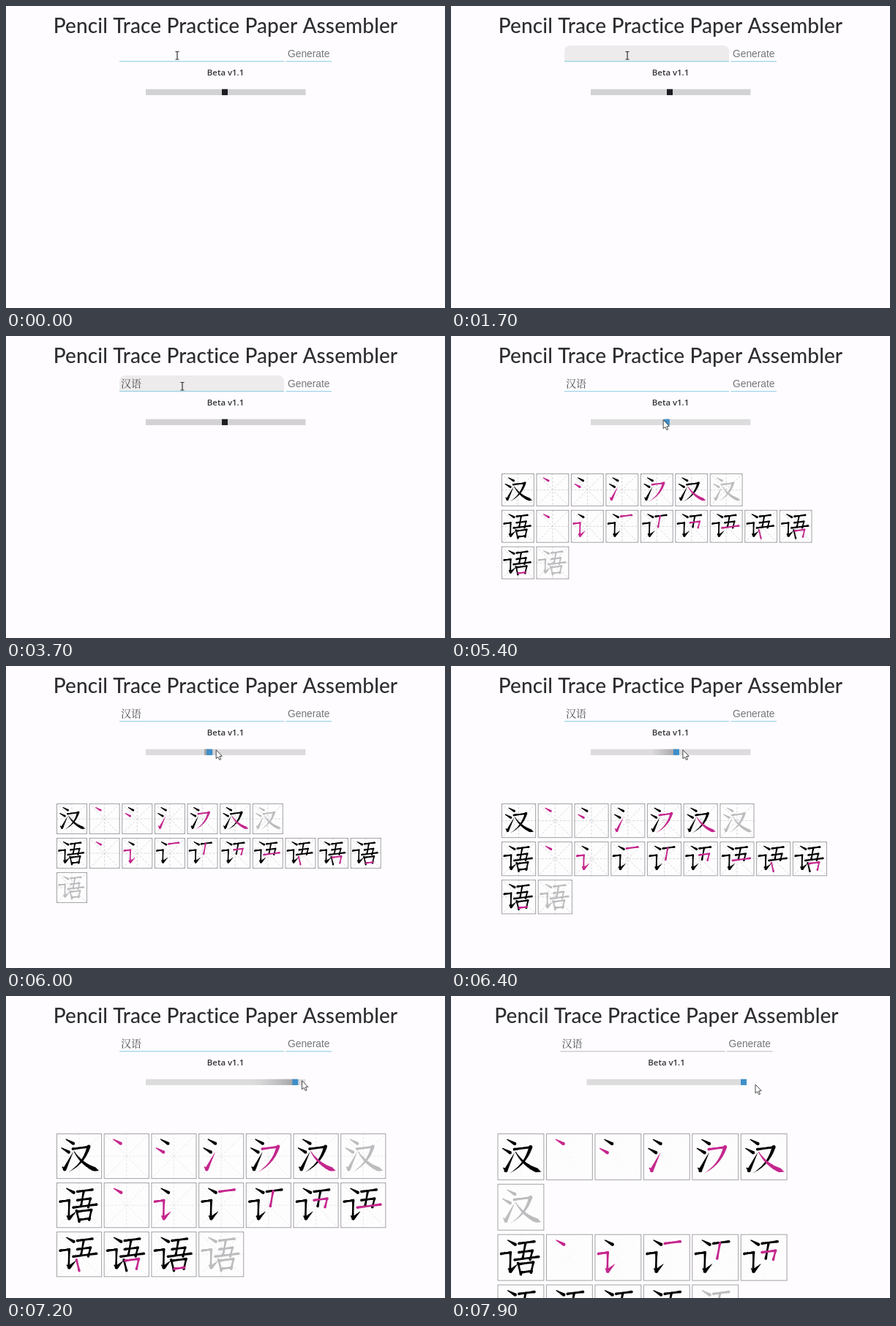
These frames come from a looping animation (600 px wide and 413 px high, 8 s). An HTML page with a canvas:

```html
<!DOCTYPE html>
<html lang="en">
<head>
<meta charset="utf-8">
<title>Pencil Trace Practice Paper Assembler</title>
<style>
  html, body { margin: 0; width: 100%; height: 100%; overflow: hidden; background: #fefcff; }
  canvas { display: block; width: 600px; height: 413px; }
</style>
</head>
<body>
<canvas id="stage"></canvas>
<script>
const W = 600, H = 413, LOOP = 8000, STEP = 100;
const INK = '#000', PINK = '#c4268c', PALE = '#bcbcbe', BLUE = '#3f8fc8';
const canvas = document.getElementById('stage');
const ctx = canvas.getContext('2d');
const dpr = window.devicePixelRatio || 1;
canvas.width = W * dpr;
canvas.height = H * dpr;

const mix = (a, b, u) => a + (b - a) * u;
const ramp = (t, from, to) => Math.max(0, Math.min(1, (t - from) / (to - from)));
const accel = u => u ** 1.4;

// One brush pull in a 100-unit cell; width is a function of progress, bend bows it sideways.
function pull(x, y, dx, dy, width, bend = 0) {
  const path = new Path2D();
  for (let i = 0; i <= 40; i++) {
    const u = i / 40, bow = bend * 4 * u * (1 - u), r = width(u) / 2;
    const px = x + dx * u - dy * bow, py = y + dy * u + dx * bow;
    path.moveTo(px + r, py);
    path.arc(px, py, r, 0, 7);
  }
  return path;
}

function join(...pulls) {
  const path = new Path2D();
  pulls.forEach(p => path.addPath(p));
  return path;
}

const even = u => 4.2 + 1.6 * (2 * u - 1) ** 2;
const swell = u => 2 + 5 * u;
const taper = u => 8 - 7 * u;
const flare = u => Math.max(1, Math.min(2 + 9 * u, 60 * (1 - u)));

const dot = (x, y) => pull(x, y, 16, 9, swell);
const bar = (x, y, len) => pull(x, y, len, -0.13 * len, even);
const fall = (x, y, lean, len) => pull(x, y, lean, len, even);
const turn = (x, y, len, drop) => join(bar(x, y, len), fall(x + len, y - 0.13 * len, -5, drop));
const flick = (x, y, dx, dy) => join(pull(x - 5, y - 5, 5, 5, swell), pull(x, y, dx, dy, taper));
const sweep = (x, y, len) => join(bar(x, y, len), pull(x + len, y - 5, -43, 55, taper, -0.1));
const press = (x, y) => pull(x, y, 55, 42, flare, 0.1);

const glyphs = [
  [dot(21, 13), dot(11, 32), flick(18, 79, 18, -37), sweep(36, 34, 35), press(39, 40)],
  [dot(22, 13), join(bar(8, 42, 20), fall(28, 39, -1, 40), flick(28, 79, 15, -15)),
    bar(46, 20, 33), fall(60, 19, -6, 33), turn(46, 39, 29, 19), bar(37, 55, 51),
    fall(44, 62, 6, 24), turn(47, 64, 30, 22), bar(51, 82, 22)]
];

// The thumb dips left, then speeds up to the right end.
const thumbAt = t => 299 - 28 * accel(ramp(t, 5250, 5820)) + 134.5 * accel(ramp(t, 5820, 7280));

function mouseAt(t) {
  if (t >= 5300) {
    const away = ramp(t, 7100, 7700);
    return [thumbAt(t) + mix(-4.5, 9, ramp(t, 5500, 6000)) + 1.5 * away, 114.7 + 6.3 * away];
  }
  const go = ramp(t, 3800, 4400), back = ramp(t, 4800, 5300);
  return [mix(mix(mix(234, 241, ramp(t, 200, 800)), 410, go), 293, back),
    mix(67.5 + ramp(t, 1800, 2800), 114.7, back)];
}

function label(text, x, y, font, color, align = 'left') {
  ctx.font = font;
  ctx.fillStyle = color;
  ctx.textAlign = align;
  ctx.fillText(text, x, y);
}

function rect(x, y, w, h, color) {
  ctx.fillStyle = color;
  ctx.fillRect(x, y, w, h);
}

function header(t, shifted) {
  ctx.letterSpacing = '0.1px';
  label('Pencil Trace Practice Paper Assembler', 300, 36.5, '500 28px Nunito, Lato, sans-serif', '#2e2e30', 'center');
  ctx.letterSpacing = '0px';
  label('Beta v1.1', 300, 95, '600 11.4px Nunito, "Open Sans", sans-serif', '#333335', 'center');

  const hover = ramp(t, 200, 500) - ramp(t, 4000, 4300);
  ctx.globalAlpha = hover;
  ctx.fillStyle = '#edebec';
  ctx.beginPath();
  ctx.roundRect(155, 54, 225, 22, [8, 8, 0, 0]);
  ctx.fill();
  ctx.globalAlpha = 1;

  const line = shifted ? '#bfc0c2' : '#8fcfe2';
  rect(155, 75.2, 225, 1.1, line);
  rect(382.5, 75.2, 62.5, 1.1, line);
  label('Generate', 385, 69.5, '13.8px "Liberation Sans", Arial, sans-serif', '#757577');
  if (t >= 2700) {
    label('汉语', 157, 70, '300 14px "Noto Serif CJK SC", "Noto Sans CJK SC", "Noto Sans CJK", serif', '#4a4a4c');
  }
}

function slider(t) {
  const live = t >= 5200, y = 113.7, h = 8.2;
  rect(191, y, 218.5, h, live ? '#dcdcdd' : '#d2d1d3');
  for (let k = 0; k < 50; k++) {
    const a = thumbAt(t - k * 10), b = thumbAt(t - k * 10 - 10);
    rect(Math.min(a, b), y, Math.abs(a - b), h, `rgba(90,90,95,${0.45 * (1 - k / 50) ** 1.5})`);
  }
  rect(thumbAt(t) - 4, y, 8, h, live ? BLUE : '#1d1c22');
}

function cell(x, y, size, strokes, step, grid) {
  ctx.save();
  ctx.translate(x, y);
  rect(0, 0, size, size, '#fefdfe');
  ctx.lineWidth = 1;
  ctx.strokeStyle = `rgba(215,214,217,${grid})`;
  ctx.setLineDash([3, 2]);
  const m = size / 2;
  ctx.beginPath();
  for (let i = 0; i < 4; i++) {
    const a = i * Math.PI / 4, r = i % 2 ? m * Math.SQRT2 : m;
    ctx.moveTo(m - r * Math.cos(a), m - r * Math.sin(a));
    ctx.lineTo(m + r * Math.cos(a), m + r * Math.sin(a));
  }
  ctx.stroke();
  ctx.setLineDash([]);
  ctx.strokeStyle = '#a3a2a5';
  ctx.strokeRect(0.5, 0.5, size - 1, size - 1);

  // Step 0 is the whole character, the step past the last stroke is the pale one.
  const last = strokes.length;
  const count = step === 0 || step > last ? last : step;
  ctx.scale(size / 100, size / 100);
  for (let i = 0; i < count; i++) {
    ctx.fillStyle = step > last ? PALE : i === step - 1 ? PINK : INK;
    ctx.fill(strokes[i]);
  }
  ctx.restore();
}

function sheet(t) {
  const size = 42 + (thumbAt(t) - 278) * 0.1714;
  const pitch = size + 2.6;
  const perRow = Math.floor((462 + 2.6) / pitch);
  const grid = mix(1, 0.12, ramp(t, 7100, 7300));
  let y = 188;
  for (const strokes of glyphs) {
    const total = strokes.length + 2;
    for (let i = 0; i < total; i++) {
      const row = Math.floor(i / perRow);
      cell(69 + (i % perRow) * pitch, y + row * (size + 5), size, strokes, i, grid);
    }
    y += Math.ceil(total / perRow) * (size + 5);
  }
}

const arrow = new Path2D('M0 0V12L2.7 9.6L4.6 13.7L6.5 12.9L4.7 8.9L8.2 8.6Z');

function pointer(t) {
  const [x, y] = mouseAt(t);
  ctx.save();
  ctx.translate(x, y);
  if (y < 76 && x < 380) {
    rect(-0.6, -5, 1.2, 10.5, '#333');
    rect(-2.5, -5.5, 5, 1, '#333');
    rect(-2.5, 5, 5, 1, '#333');
  } else {
    ctx.fillStyle = '#fff';
    ctx.fill(arrow);
    ctx.strokeStyle = '#333';
    ctx.lineWidth = 0.9;
    ctx.stroke(arrow);
  }
  ctx.restore();
}

function draw(t) {
  const shifted = t >= 7300;
  ctx.setTransform(dpr, 0, 0, dpr, 0, 0);
  rect(0, 0, W, H, '#fefcff');
  ctx.save();
  if (shifted) ctx.translate(-5.5, 0);
  header(t, shifted);
  slider(t);
  if (t >= 4700) sheet(t);
  ctx.restore();
  pointer(t);
}

const start = performance.now();
function tick() {
  const t = (performance.now() - start) % LOOP;
  draw(Math.floor(t / STEP) * STEP);
  requestAnimationFrame(tick);
}
tick();
</script>
</body>
</html>
```
